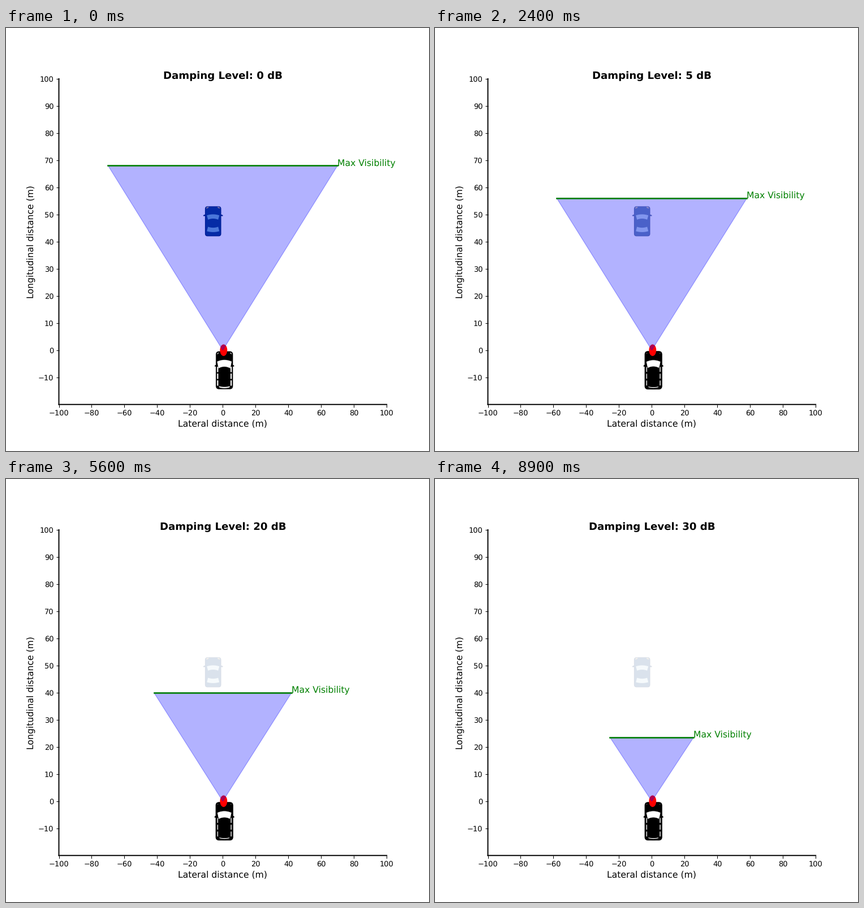
These frames come from a looping animation (748 by 748 pixels, 9 s). A matplotlib script:

```python
import numpy as np
import matplotlib.pyplot as plt
from matplotlib.animation import FuncAnimation
from matplotlib.patches import Circle, Ellipse, FancyBboxPatch, Polygon
from matplotlib.transforms import Affine2D

FRAMES = 90
STEP = 0.5
DPI = 93.5

plt.rcParams["font.family"] = "DejaVu Sans"
plt.rcParams["text.hinting"] = "no_hinting"
fig, ax = plt.subplots(figsize=(8, 8), dpi=DPI)
ax.set_xlim(-100, 100)
ax.set_ylim(-20, 100)
ax.set_xticks(range(-100, 101, 20))
ax.set_yticks(range(-10, 101, 10))
ax.set_xlabel("Lateral distance (m)", fontsize=12)
ax.set_ylabel("Longitudinal distance (m)", fontsize=12)
for side in ("top", "right"):
    ax.spines[side].set_visible(False)
for side in ("left", "bottom"):
    ax.spines[side].set_linewidth(1.5)
    ax.spines[side].set_snap(False)


class Car:
    """Parts drawn in stage pixels around the front centre, y pointing down."""

    def __init__(self, x, y, z):
        self.place = (Affine2D().translate(x, y).scale(1 / DPI, -1 / DPI)
                      .translate(0, 8) + fig.dpi_scale_trans)
        self.z = z

    def add(self, patch, color, rim=0):
        patch.set(facecolor=color, linewidth=rim, zorder=self.z,
                  transform=self.place)
        return ax.add_patch(patch)

    def box(self, x, y, w, h, r, color, rim=0):
        """Rounded box, x being its middle and y its front."""
        style = f"round,pad=0,rounding_size={r}"
        return self.add(FancyBboxPatch((x - w / 2, y), w, h, boxstyle=style),
                        color, rim)

    def oval(self, x, y, w, h, color, angle=0, rim=0):
        return self.add(Ellipse((x, y), w, h, angle=angle), color, rim)

    def glass(self, front, back, bow, color, rim=0):
        """Pane between two bowed edges, each given as (y, half width)."""
        u = np.linspace(-1, 1, 21)
        edges = [np.c_[w * u, y + bow * u**2] for y, w in (front, back)]
        return self.add(Polygon(np.vstack([edges[0], edges[1][::-1]])), color, rim)


# Car ahead: (patch, colour, how fast it fades)
BODY, DARK, GLASS, LAMP = np.array(
    [(8, 62, 128), (0, 40, 104), (108, 171, 203), (165, 155, 130)]) / 255
ahead = Car(366.2, 315.3, 0.5)
fading = [(ahead.oval(s * 15, 16, 5, 2.4, DARK, 15 * s), DARK, 1) for s in (-1, 1)]
fading += [(ahead.box(0, 0, 28.6, 53, 4.5, DARK), DARK, 1),
           (ahead.box(0, 1, 26.2, 51, 4, BODY), BODY, 1)]
fading += [(ahead.oval(s * 10, 2.3, 5, 2.4, LAMP, 25 * s), LAMP, 1) for s in (-1, 1)]
fading += [(ahead.glass((14.2, 11), (21.8, 9), 1.8, GLASS), GLASS, 1.5),
           (ahead.glass((37.8, 9), (45.6, 11), -1.6, GLASS), GLASS, 1.5)]

# Own car: black, with clear windows whose rims turn black
own = Car(386.2, 571.8, 0.3)
rims = [own.oval(s * 14.8, 25.3, 5, 2.6, "black", 20 * s, 0.5) for s in (-1, 1)]
rims += [own.box(0, 0, 30, 66.8, 5.5, "black", 0.9),
         own.glass((15, 13), (27.2, 10.5), 3, "white", 0.8),
         own.glass((62.8, 10), (65.2, 9), -1.4, "white", 0.8)]
for s in (-1, 1):
    rims.append(own.oval(s * 11.5, 3.6, 4, 1.4, "white", 40 * s, 0.8))
    for k in range(3):
        rims.append(own.box(s * 11.9, 27 + 12 * k, 2.4, 10, 1, "white", 0.8))

ax.add_patch(Circle((0.5, 0), 2, color="red", zorder=0.8))
beam = ax.add_patch(Polygon([(0, 0), (-70, 68), (70, 68)], color="blue", alpha=0.3))
limit, = ax.plot([], [], color="green", linewidth=2)
label = ax.text(70, 68, "Max Visibility", color="green", fontsize=12)
title = ax.text(0.5, 1, "", transform=ax.transAxes, ha="center",
                fontsize=14, fontweight="bold")


def update(i):
    reach, half = 68 - STEP * i, 70 - STEP * i
    beam.set_xy([(0, 0), (-half, reach), (half, reach)])
    limit.set_data([-half, half], [reach, reach])
    label.set_position((half, reach))
    title.set_text(f"Damping Level: {i * 7 // FRAMES * 5} dB")

    seen = max(0.15, 1 - i / 60)
    for patch, color, power in fading:
        patch.set_facecolor(1 - (1 - color) * seen**power)
    for patch in rims:
        patch.set_edgecolor((0, 0, 0, 1 - 0.8 * 0.75**i))
    return []


anim = FuncAnimation(fig, update, frames=FRAMES, interval=100,
                     repeat=True, repeat_delay=0, blit=False)
plt.show()
```
